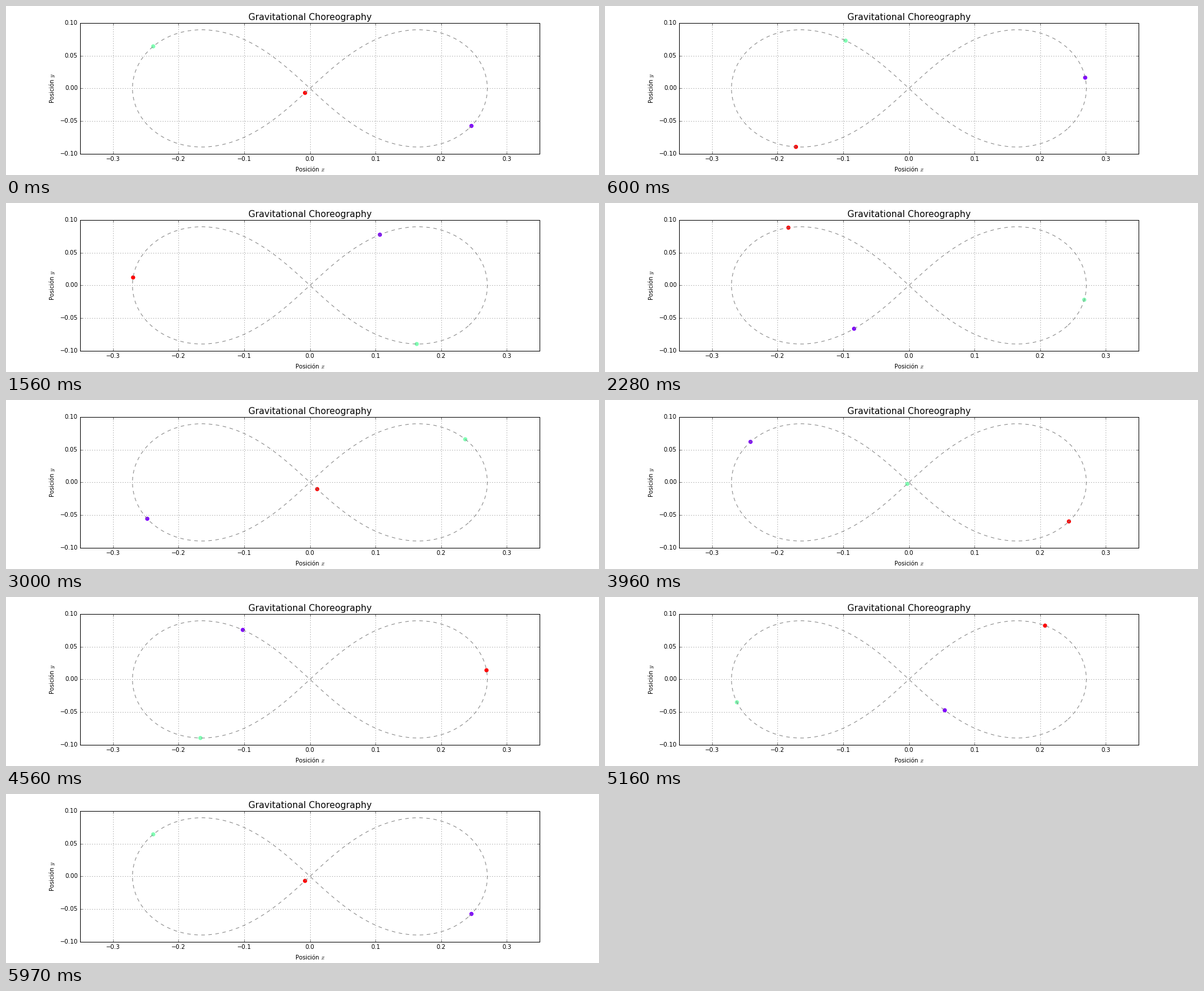
These frames come from a looping animation (1008 px wide and 288 px high, 6.03 s). A matplotlib script:

```python
import matplotlib.pyplot as plt
import numpy as np
from matplotlib.animation import FuncAnimation

plt.style.use("classic")
plt.rcParams.update({
    "font.family": "DejaVu Sans",
    "font.size": 10,
    "figure.dpi": 72,
    "savefig.dpi": "figure",
    "figure.facecolor": "white",
    "savefig.facecolor": "white",
})

PERIOD = 6.32591398
STEPS = 199      # animation steps per orbit
SUBSTEPS = 10    # integration steps per animation step
SCALE = 0.25


def accel(pos):
    gap = pos[None] - pos[:, None]
    dist = np.sqrt((gap ** 2).sum(-1)) + np.eye(3)
    return (gap / dist[..., None] ** 3).sum(1)


def slope(state):
    return np.array([state[1], accel(state[0])])


def rk4(state, dt):
    k1 = slope(state)
    k2 = slope(state + dt / 2 * k1)
    k3 = slope(state + dt / 2 * k2)
    k4 = slope(state + dt * k3)
    return state + dt / 6 * (k1 + 2 * k2 + 2 * k3 + k4)


def figure_eight():
    """Positions of the three equal masses over one period."""
    p = np.array([0.97000436, -0.24308753])
    v = np.array([-0.93240737, -0.86473146])
    state = np.array([[p, -p, 0 * p], [-v / 2, -v / 2, v]])
    track = [state[0]]
    for _ in range(STEPS):
        for _ in range(SUBSTEPS):
            state = rk4(state, PERIOD / STEPS / SUBSTEPS)
        track.append(state[0])
    return SCALE * np.array(track)


track = figure_eight()

fig = plt.figure(figsize=(14, 4))
fig.subplots_adjust(left=0.125, right=0.9, bottom=0.125, top=0.9)
ax = fig.add_subplot()
ax.set_title("Gravitational Choreography", fontsize=15)
ax.set_xlabel("Posición $x$")
ax.set_ylabel("Posición $y$")
ax.set_xlim(-0.35, 0.35)
ax.set_ylim(-0.1, 0.1)
ax.set_xticks(np.arange(-3, 4) / 10)
ax.set_yticks(np.arange(-2, 3) / 20)
ax.grid(True)

ax.plot(track[:, 0, 0], track[:, 0, 1], "--", color="gray")
dots = ax.scatter(*track[1].T, s=50, edgecolors="none",
                  c=plt.cm.rainbow(np.linspace(0, 1, 3)))


def draw(i):
    # the closing pose is held for one extra tick
    step = min(i, STEPS) + 1
    dots.set_offsets(track[(step - 1) % STEPS + 1])
    return dots,


anim = FuncAnimation(fig, draw, frames=STEPS + 2, interval=30,
                     repeat=True, repeat_delay=0)
plt.show()
```
